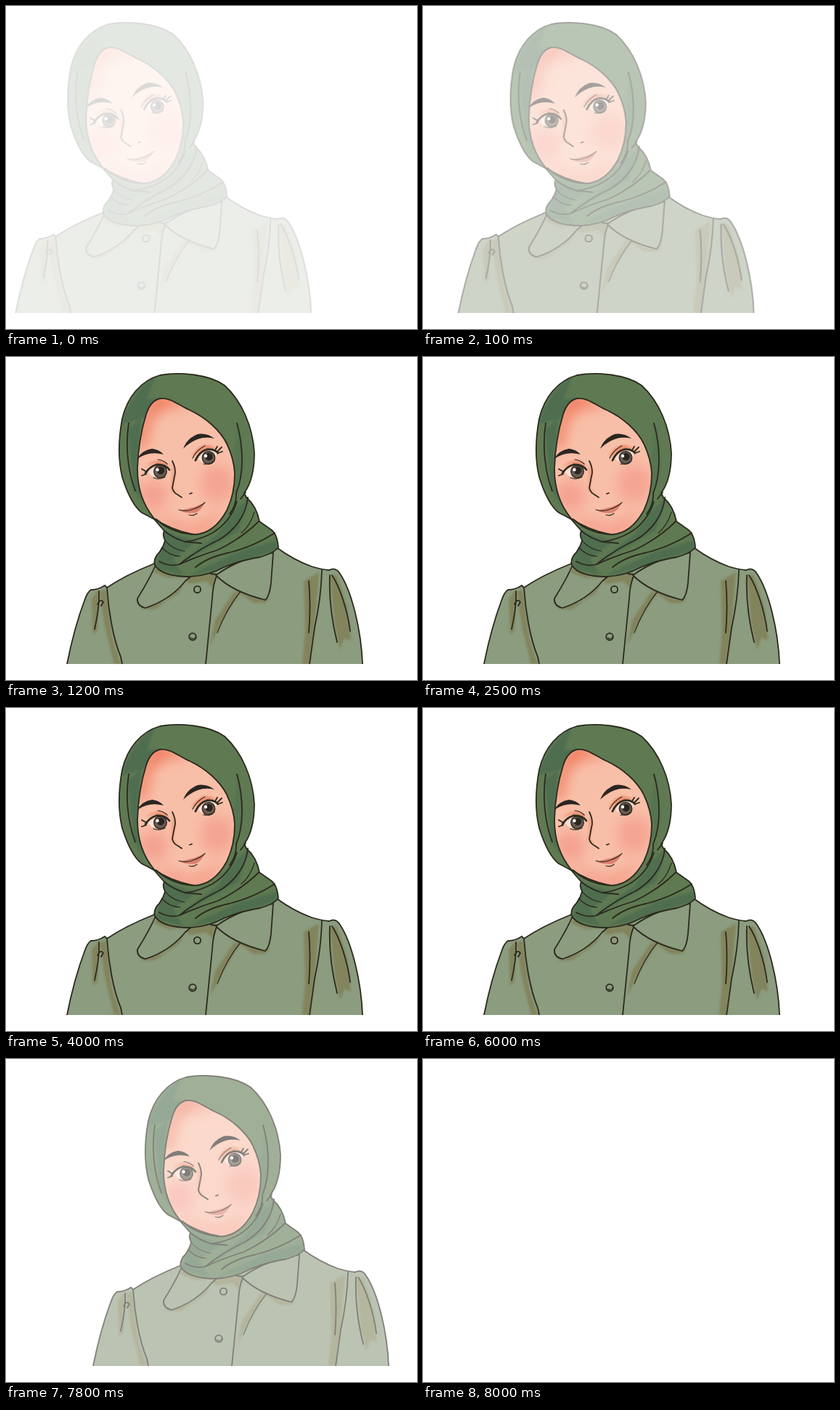
Animation of 566 by 444 pixels, one loop 8500 ms. Source, as an HTML page:

```html
<!DOCTYPE html>
<html lang="en">
<head>
<meta charset="utf-8">
<title>Portrait</title>
<style>
html, body { margin: 0; width: 100%; height: 100%; overflow: hidden; background: #fff; }
svg { display: block; width: 100%; height: 100%; }
.line { fill: none; stroke: #2b2a1e; stroke-width: 1.8; stroke-linecap: round; stroke-linejoin: round; }
.fine { stroke-width: 1.2; }
.ink { fill: #2b2520; }
.tan { fill: #7f7c51; opacity: .75; }
.shade { fill: #466850; opacity: .65; }
</style>
</head>
<body>
<svg viewBox="0 0 566 444">
  <defs>
    <filter id="soft" x="-50%" y="-50%" width="200%" height="200%"><feGaussianBlur stdDeviation="1.8"/></filter>
    <filter id="blush" x="-80%" y="-80%" width="260%" height="260%"><feGaussianBlur stdDeviation="9"/></filter>
    <path id="coat" d="M84 422Q94 372 108 335Q112 323 117 320Q127 320 136 314L139 317Q164 300 204 284L215 262H373Q396 279 421 288Q434 292 445 293Q454 288 460 298C476 322 489 374 491 422"/>
    <path id="scarf" d="M212 25C187 32 167 54 160 85C155 112 154 140 160 165C166 184 175 205 187 214Q197 219 204 223L218 239Q215 245 219 252Q216 264 208 272Q203 279 205 286C211 297 230 302 252 302Q278 301 300 289Q324 279 350 275Q368 270 375 262Q374 245 366 238L349 226Q345 205 331 193L328 187C339 172 342 152 342 132C340 96 325 61 301 39C280 24 240 20 212 25Z"/>
    <path id="face" d="M212 57C226 55 239 67 253 73C275 83 295 101 304 119Q314 140 315 160Q315 188 304 211C293 231 279 243 260 244Q229 239 204 222C190 205 181 182 181 154C182 123 187 98 193 79Q199 60 212 57Z"/>
    <clipPath id="coatClip"><use href="#coat"/></clipPath>
    <clipPath id="scarfClip"><use href="#scarf"/></clipPath>
    <clipPath id="faceClip"><use href="#face"/></clipPath>
    <clipPath id="stageClip"><rect width="566" height="422"/></clipPath>
  </defs>

  <g id="portrait"><g clip-path="url(#stageClip)">
    <use href="#coat" fill="#8c9c7f"/>
    <g clip-path="url(#coatClip)">
      <g class="tan" filter="url(#soft)">
        <path d="M118 332L128 320L126 376L120 382Z"/>
        <path d="M129 322L138 320L146 385L158 422H149L136 370Z"/>
        <path d="M410 308L431 296L425 370L418 422H408L412 375Z"/>
        <path d="M446 302L455 300L470 344L475 390L466 386L460 402L453 370Z"/>
        <path d="M313 324L324 322L303 354L281 396L288 362Z"/>
        <path d="M181 336L192 344L220 335L248 308L238 324L205 347H188Z"/>
        <path d="M303 312L345 332L363 331L357 338H341Z"/>
        <path d="M246 302L290 297L285 318L276 308L252 312Z"/>
      </g>
    </g>
    <g class="line">
      <use href="#coat"/>
      <path d="M139 317C141 347 147 386 158 412L160 422M128 322Q129 344 122 374M126 340Q130 331 134 337L131 342"/>
      <path d="M435 293Q434 331 425 372L418 422M417 308Q420 342 417 379M446 300Q444 344 456 392M449 300C459 315 470 346 474 377"/>
      <path d="M282 298L291 299Q285 311 284 332L275 422"/>
      <path d="M324 321Q304 345 291 379" class="fine"/>
      <circle cx="263.500" cy="319.500" r="4.600"/>
      <circle cx="257" cy="384.500" r="4.800"/>
      <path d="M254 386Q258 389 261 385" class="fine"/>
    </g>
    <g class="line" style="fill:#8c9c7f">
      <path d="M207 284Q199 303 181 332Q180 342 192 345Q226 334 247 308L254 302"/>
      <path d="M289 300Q312 323 357 334Q363 329 365 310L368 269Q324 275 289 300"/>
    </g>
    <path d="M208 286L230 301L250 303L224 304L204 296Z" class="tan" filter="url(#soft)"/>

    <use href="#scarf" fill="#5f7a52"/>
    <g clip-path="url(#scarfClip)">
      <g class="shade" filter="url(#soft)">
        <path d="M205 27C184 40 166 66 160 92L190 84L212 57L194 58Z"/>
        <path d="M168 100L186 84L180 150L190 203L176 182Z"/>
        <path d="M218 239L262 254L230 277L244 300L205 290L214 260Z"/>
        <path d="M335 193L320 239L262 271L238 284L291 244L316 210Z"/>
        <path d="M373 252L320 268L270 291L252 301L294 291L375 265Z"/>
        <path d="M320 92L327 150L318 188L314 186V138Z" opacity=".5"/>
      </g>
    </g>

    <use href="#face" fill="#f8bfa8"/>
    <g clip-path="url(#faceClip)">
      <g filter="url(#blush)">
        <path d="M178 120Q190 50 214 46L252 70L222 69L201 84L190 130Z" fill="#f07f62"/>
        <ellipse cx="203" cy="190" rx="20" ry="20" fill="#f5a090"/>
        <ellipse cx="291" cy="174" rx="24" ry="26" fill="#f5a492"/>
        <path d="M200 215L258 232L300 209L278 248L234 246Z" fill="#f59f8a"/>
      </g>
      <g filter="url(#soft)" fill="#ee8f70">
        <path d="M193 150Q209 135 225 150L220 151L205 146Z"/>
        <path d="M255 138Q269 112 290 126L279 126L264 133Z"/>
        <path d="M229 146L234 160L230 180L238 190L227 183Z" opacity=".6"/>
      </g>
    </g>
    <use href="#face" class="line"/>

    <g class="ink">
      <path d="M180 141Q187 128 201 126Q211 127 217 134Q206 131 197 133Q187 135 180 141Z"/>
      <path d="M244 126Q250 111 264 106Q276 104 287 112Q274 109 264 113Q253 117 244 126Z"/>
    </g>
    <path d="M196 158Q207 146 223 154L220 163Q210 168 200 163Z" fill="#f8e2d6"/>
    <path d="M265 140Q270 129 283 128L290 133Q288 143 280 146Q271 147 265 140Z" fill="#f8e2d6"/>
    <g id="iris">
      <circle cx="212.500" cy="157.500" r="8.700" fill="#6a5b50" stroke="#332b26" stroke-width="1.500"/>
      <circle cx="213" cy="156" r="5.200" class="ink"/>
      <circle cx="208.500" cy="155" r="2.200" fill="#fff"/>
    </g>
    <use href="#iris" x="66.500" y="-19"/>
    <g class="line">
      <path d="M192 160Q197 151 207 148Q219 147 225 155M261 142Q266 130 277 127Q287 126 292 132" style="stroke-width:2.800"/>
      <path d="M194 158L187 154M193 161L187 163M288 128L291 123M291 130L297 124M292 132L298 130"/>
      <path d="M203 166Q211 169 219 165M272 147Q280 148 287 143M209 141Q217 142 222 147M257 139Q263 127 274 122" class="fine"/>
      <path d="M229 143Q235 155 232 164L229 180Q231 187 236 189L242 193M253 188L256 187"/>
    </g>
    <path d="M239 211Q249 209 255 207Q259 207 262 205L274 200Q269 211 261 214Q249 216 239 211Z" fill="#dc8070"/>
    <path d="M238 210Q249 213 258 209Q266 207 274 200M252 217Q258 219 263 215" class="line fine"/>

    <g class="line">
      <use href="#scarf"/>
      <path d="M169 91C164 123 168 158 178 184M318 91C327 123 328 161 317 187Q318 202 308 216M330 186L323 195"/>
      <path d="M333 193C331 217 315 239 292 252Q264 265 239 285M318 199Q309 227 284 242Q265 252 246 254"/>
      <path d="M207 223Q226 241 257 244M218 239Q230 249 247 254L269 256"/>
      <path d="M348 226Q325 249 292 265Q263 274 239 285Q226 289 211 281M370 242Q340 261 307 269Q278 275 261 289"/>
      <path d="M219 252Q228 264 246 267M215 262Q224 273 240 274M342 213Q337 231 324 242" class="fine"/>
    </g>
  </g></g>
</svg>
<script>
const LOOP = 8500, STEP = 100, EXIT = 7450, GONE = 8000;
const portrait = document.getElementById("portrait");

// Expo-out slide in from the left, accelerating slide out to the right.
function pose(t) {
  if (t >= GONE) return { x: 0, alpha: 0 };
  if (t < EXIT) {
    const x = t < 1000 ? -100 * 2 ** (-(t + 50) / 100) : 0;
    return { x, alpha: Math.min(1, 0.17 + t * 0.0026) };
  }
  const out = t - EXIT;
  return { x: 36 * (out / 350) ** 2.1, alpha: 1 - (out / (GONE - EXIT)) ** 2 };
}

function draw(now) {
  const t = Math.floor((now % LOOP) / STEP) * STEP;
  const { x, alpha } = pose(t);
  portrait.setAttribute("transform", `translate(${x.toFixed(2)} 0)`);
  portrait.setAttribute("opacity", alpha.toFixed(3));
}

let start;
function tick(now) {
  start ??= now;
  draw(now - start);
  requestAnimationFrame(tick);
}
draw(0);
requestAnimationFrame(tick);
</script>
</body>
</html>
```
